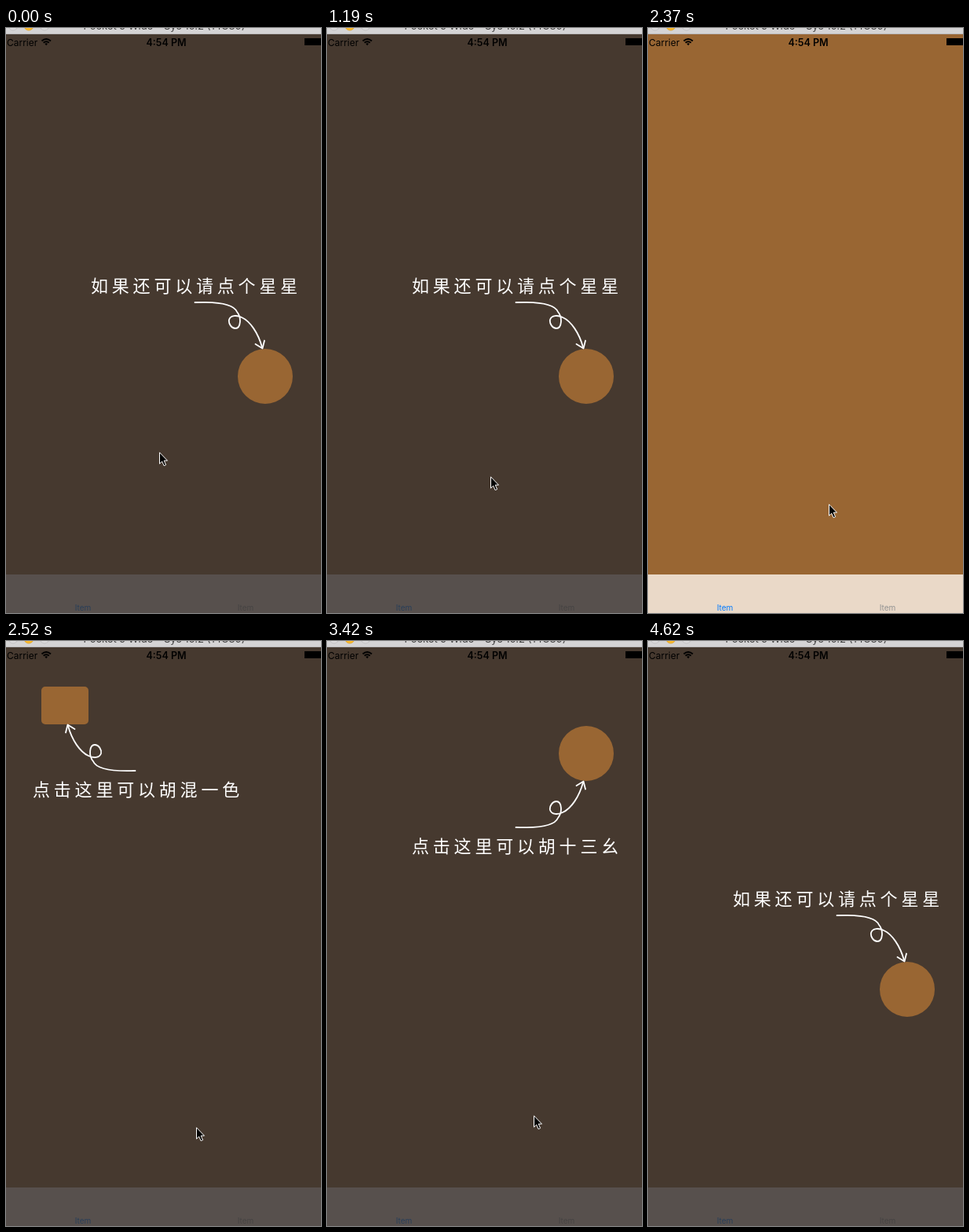
Write an HTML page that moves like this. It is 401 px wide and 744 px high and loops after 5770 ms.

```html
<!DOCTYPE html>
<html lang="zh">
<head>
<meta charset="utf-8">
<style>
  html, body { margin: 0; width: 100%; height: 100%; overflow: hidden; background: #996633; }
  svg { display: block; width: 100%; height: 100%; }
  text { font-family: Inter, "Liberation Sans", sans-serif; }
  #hint { font: 500 22px "Noto Sans CJK SC", "Noto Sans CJK", sans-serif; letter-spacing: 4.8px; fill: #fff; }
</style>
</head>
<body>
<svg viewBox="0 0 401 744">
  <rect y="8" width="401" height="736" fill="#996633"/>
  <rect y="695" width="401" height="49" fill="#ead9c8"/>
  <g font-size="10" text-anchor="middle">
    <text x="98" y="741" fill="#007aff">Item</text>
    <text x="305" y="741" fill="#929292">Item</text>
  </g>

  <g id="guide">
    <path id="dim" fill="#322f2f" fill-opacity=".8" fill-rule="evenodd"/>
    <text id="hint"></text>
    <g id="arrow" fill="none" stroke="#fff" stroke-width="1.8" stroke-linecap="round" stroke-linejoin="round">
      <path d="M-89.500-59C-62-60-40-57-36-47C-30-40-31-26-38-26C-43-26-47-32-46-37C-44-43-36-43-30-40C-19-35-9-20-4-2"/>
      <path d="M-12.500-6L-3.500-.500L-1-10.500"/>
    </g>
  </g>

  <rect width="401" height="8" fill="#d5d4d5"/>
  <rect y="7" width="401" height="1" fill="#b9b7b8"/>
  <g stroke-width=".8">
    <circle cx="9" cy="-3" r="6" fill="#dddcdd" stroke="#bdbbbd"/>
    <circle cx="29" cy="-3" r="6" fill="#fdbc2e" stroke="#dfa023"/>
    <circle cx="49" cy="-3" r="6" fill="#dddcdd" stroke="#bdbbbd"/>
  </g>
  <text x="201.500" y="2" font-size="13" text-anchor="middle" fill="#444">Pocket 5 Wide – Sys 10.2 (14C89)</text>

  <text x="1" y="23" font-size="12">Carrier</text>
  <text x="204" y="23" font-size="12.500" font-weight="600" text-anchor="middle">4:54 PM</text>
  <g fill="none" stroke="#000" stroke-width="1.900">
    <path d="M45.500 16.500Q51.200 11.300 57 16.500M47.700 18.800Q51.200 15.700 54.800 18.800"/>
    <path d="M49.400 20L51.200 22.300L53 20Q51.200 18.700 49.400 20Z" fill="#000" stroke="none"/>
  </g>
  <rect x="380" y="13" width="22" height="9"/>

  <path id="cursor" d="M.5 .8V15.200L3.700 12.200L6.100 17.700L8.600 16.600L6.200 11.200H10.500Z" stroke="#fff"/>
</svg>
<script>
const LOOP = 5770, TICK = 149, LEAD = 14;
const $ = id => document.getElementById(id);

function set(id, attrs) {
  for (const name in attrs) $(id).setAttribute(name, attrs[name]);
}

// A highlighted item is a rounded box around its centre.
const item = (text, cx, cy, w, h, r) => ({ text, cx, cy, w, h, r });
const star = item("如果还可以请点个星星", 330, 443, 70, 70, 35);
const mixed = item("点击这里可以胡混一色", 75, 82, 60, 48, 5);
const orphans = item("点击这里可以胡十三幺", 330, 143, 70, 70, 35);
const pure = item("点击这里可以胡清一色", 55, 401, 60, 48, 5);

const scenes = [[0, star], [1790, null], [2520, mixed], [3120, orphans], [3720, pure], [4170, star]];

// Pointer strokes: first tick, length in ticks, where the tip comes to rest
const origin = [195, 539];
const strokes = [
  [0, 3, 202, 580], [5, 3, 208, 570], [13, 2, 232, 621], [15, 1, 230, 605], [16, 1, 242, 618],
  [17, 2, 301, 587], [21, 1, 263, 603], [24, 2, 250, 609], [28, 2, 330, 738]
];
const LAST_TICK = 30;

const easeOut = p => 1 - (1 - p) ** 2;

function hole({ cx, cy, w, h, r }) {
  const corner = (dx, dy) => `a${r} ${r} 0 0 1 ${dx} ${dy}`;
  const across = w - 2 * r, down = h - 2 * r;
  return `M${cx - across / 2} ${cy - h / 2}h${across}${corner(r, r)}v${down}${corner(-r, r)}` +
    `h${-across}${corner(-r, -r)}v${-down}${corner(r, -r)}Z`;
}

// The hint sits on the side of the item that faces the middle of the screen.
let shown;
function showGuide(it) {
  if (it === shown) return;
  shown = it;
  $("guide").style.display = it ? "" : "none";
  if (!it) return;
  const side = it.cx < 200 ? -1 : 1;
  const dir = it.cy < 376 ? -1 : 1;
  const edge = it.cy - dir * it.h / 2;
  set("dim", { d: "M0 8H401V744H0Z" + hole(it) });
  set("arrow", { transform: `translate(${it.cx} ${edge}) scale(${side} ${dir})` });
  set("hint", { x: it.cx - (side < 0 ? 41 : 222), y: edge + (dir < 0 ? 91 : -72.5) });
  $("hint").textContent = it.text;
}

function pointer(tick) {
  let [x, y] = origin;
  for (const [from, len, toX, toY] of strokes) {
    const k = easeOut(Math.min(1, Math.max(0, (tick - from) / len)));
    x += (toX - x) * k;
    y += (toY - y) * k;
  }
  return [Math.round(x), Math.round(y)];
}

function draw(t) {
  showGuide(scenes.findLast(([from]) => from <= t)[1]);
  const tick = Math.floor((t + LEAD) / TICK);
  const [x, y] = pointer(tick);
  set("cursor", { transform: `translate(${x} ${y})`, visibility: tick > LAST_TICK ? "hidden" : "visible" });
}

const start = performance.now();
function frame() {
  draw((performance.now() - start) % LOOP);
  requestAnimationFrame(frame);
}
frame();
</script>
</body>
</html>
```
